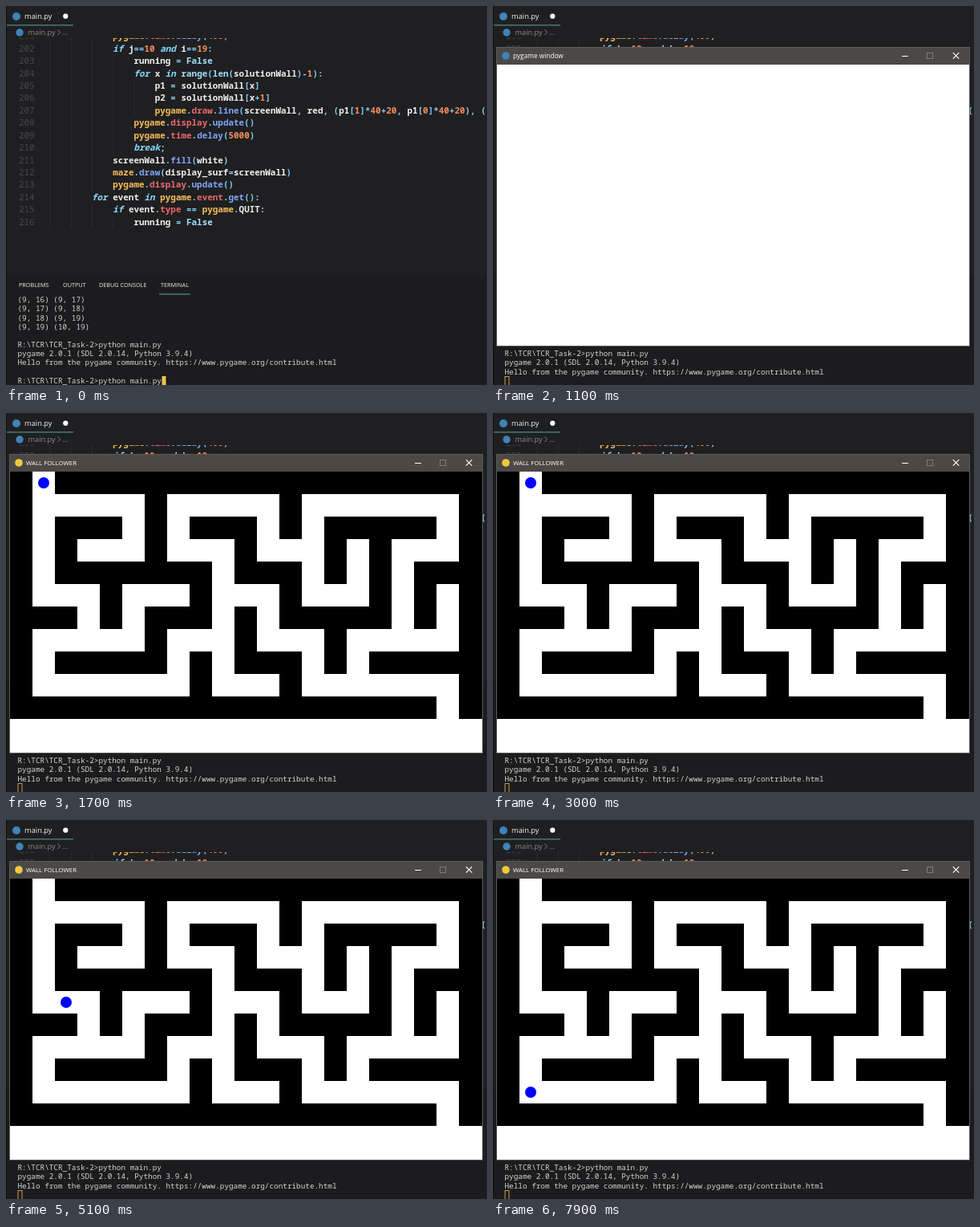
Recreate the animation shown at these times as an HTML page. Size 600x472 px, loop 8000 ms.

```html
<!DOCTYPE html>
<html lang="en">
<head>
<meta charset="utf-8">
<title>Wall follower</title>
<style>
  html, body { margin: 0; width: 100%; height: 100%; overflow: hidden; background: #1f1f21; }
  svg { display: block; width: 600px; height: 472px; }
  text { white-space: pre; }
  .code { font: 600 10.93px "Noto Sans Mono", monospace; font-variant-ligatures: none; }
  .term { font: 500 9.36px "Noto Sans Mono", monospace; font-variant-ligatures: none; fill: #d4d4d4; }
  .ui { font-family: "Open Sans", "Noto Sans", sans-serif; }
</style>
</head>
<body>
<svg id="stage" viewBox="0 0 600 472">
  <defs><clipPath id="view"><rect y="40" width="600" height="295"/></clipPath></defs>
  <rect width="600" height="472" fill="#1f1f21"/>
  <g id="editor" clip-path="url(#view)"></g>

  <g class="ui">
    <circle cx="13" cy="13" r="5" fill="#3f83b8"/>
    <text x="23" y="16" font-size="9.3" fill="#f4f4f4">main.py</text>
    <circle cx="74.3" cy="12.7" r="3.1" fill="#fff"/>
    <rect x="1" y="23.4" width="83" height="1" fill="#56a897"/>
    <circle cx="17" cy="33" r="4.7" fill="#3f83b8"/>
    <text x="27.5" y="35.8" font-size="9.2" fill="#8c8c8c">main.py</text>
    <path d="M64.5 29.5l3 3.3l-3 3.3" fill="none" stroke="#8c8c8c" stroke-width=".9"/>
    <text x="70" y="35.8" font-size="9.2" fill="#8c8c8c">...</text>
  </g>

  <rect y="335" width="600" height="137" fill="#1c1c1e"/>
  <g id="tabs" class="ui" font-size="7.25" font-weight="500" fill="#f0f0f0"></g>
  <rect x="191" y="358.4" width="39" height="1" fill="#56a897"/>
  <g id="term" class="term"></g>
  <rect id="caret" width="5" height="11"/>
  <rect width="1" height="472" fill="#0c0c0d"/>

  <g id="window">
    <rect x="4.5" y="51.5" width="590" height="372" fill="#4b4947" stroke="#5c5b59"/>
    <circle id="icon" cx="16" cy="62" r="4.8"/>
    <text id="caption" class="ui" x="25" y="65.2" fill="#fff"></text>
    <path d="M510 62.5h8" stroke="#fff"/>
    <rect x="541.5" y="58.5" width="7" height="7" fill="none" stroke="#7d7b79"/>
    <path d="M573.8 58.2l7.5 7.5m0 -7.5l-7.5 7.5" stroke="#fff" stroke-width="1.1"/>
    <rect id="screen" x="5" y="73" width="589" height="350"/>
    <g id="maze" shape-rendering="crispEdges"></g>
    <circle id="ball" r="7" fill="#00f"/>
  </g>
</svg>
<script>
const $ = id => document.getElementById(id);
const NS = "http://www.w3.org/2000/svg";
function add(parent, tag, attrs, text) {
  const el = document.createElementNS(NS, tag);
  set(el, attrs);
  if (text !== undefined) el.textContent = text;
  return parent.appendChild(el);
}
function set(el, attrs) {
  for (const k in attrs) el.setAttribute(k, attrs[k]);
}

// Editor: each entry is [indent level, code]
const CODE = [
  [3, "pygame.time.delay(400)"],
  [3, "if j==10 and i==19:"],
  [4, "running = False"],
  [4, "for x in range(len(solutionWall)-1):"],
  [5, "p1 = solutionWall[x]"],
  [5, "p2 = solutionWall[x+1]"],
  [5, "pygame.draw.line(screenWall, red, (p1[1]*40+20, p1[0]*40+20), ("],
  [4, "pygame.display.update()"],
  [4, "pygame.time.delay(5000)"],
  [4, "break;"],
  [3, "screenWall.fill(white)"],
  [3, "maze.draw(display_surf=screenWall)"],
  [3, "pygame.display.update()"],
  [2, "for event in pygame.event.get():"],
  [3, "if event.type == pygame.QUIT:"],
  [4, "running = False"]
];
const LEFT = 54.5, CHAR = 6.56, LINE = 15.43;
const KEYWORD = /^(if|and|for|in|break)$/;

function colour(word, before, after) {
  if (KEYWORD.test(word)) return "#89ddff";
  if (/^(False|range|len)$/.test(word)) return "#a5e0fb";
  if (/^\d+$/.test(word)) return "#f78c5c";
  if (/^(pygame|maze)$/.test(word)) return "#f5bd58";
  if (/^\W/.test(word)) return "#7fd0f5";
  if (after === "(") return "#7ea6f7";
  if (before === "." && word !== "QUIT") return "#e8686c";
  return "#eeeeee";
}

CODE.forEach(([level, src], i) => {
  const y = 41.3 + i * LINE;
  for (let g = 0; g < level; g++)
    add($("editor"), "rect", { x: LEFT + g * 4 * CHAR, y: y - 11.5, width: 1, height: LINE, fill: "#2c2c2e" });
  add($("editor"), "text", { class: "code", x: 16, y, fill: "#48484a", style: "font-weight:400" }, 201 + i);
  const line = add($("editor"), "text", { class: "code", x: LEFT + level * 4 * CHAR, y });
  for (const m of src.matchAll(/[A-Za-z_]\w*|\d+|\s+|[^\w\s]+/g)) {
    const word = m[0], end = m.index + word.length;
    const span = add(line, "tspan", { fill: colour(word, src[m.index - 1], src[end]) }, word);
    if (KEYWORD.test(word)) span.setAttribute("font-style", "italic");
  }
});

[["PROBLEMS", 16], ["OUTPUT", 71], ["DEBUG CONSOLE", 116], ["TERMINAL", 193]]
  .forEach(([name, x]) => add($("tabs"), "text", { x, y: 350.4 }, name));

// Terminal
const RUN = ["R:\\TCR\\TCR_Task-2>python main.py",
  "pygame 2.0.1 (SDL 2.0.14, Python 3.9.4)",
  "Hello from the pygame community. https://www.pygame.org/contribute.html", ""];
const LOG = ["(9, 16) (9, 17)", "(9, 17) (9, 18)", "(9, 18) (9, 19)", "(9, 19) (10, 19)", "", ...RUN, ...RUN];
const rows = Array.from({ length: 10 }, (_, i) => add($("term"), "text", { x: 14.5, y: 369.3 + i * 11.16 }));

// Maze
const CELL = 28;
const MAZE = [
  " #                   ",
  " ##### ##### ####### ",
  " #   # #   # #     # ",
  " # ### ### ### # ### ",
  " #       #   # # #   ",
  " ### ### ### ### # # ",
  "   # #   # #     # # ",
  " ##### ### ### ##### ",
  " #     # #   # #     ",
  " ####### ### ####### ",
  "                   # "
];
MAZE.forEach((row, r) => {
  for (const m of row.matchAll(/#+/g))
    add($("maze"), "rect", { x: 5 + m.index * CELL, y: 73 + r * CELL,
      width: m[0].length * CELL, height: CELL, fill: "#fff" });
});
add($("maze"), "rect", { x: 5, y: 381, width: 589, height: 42, fill: "#fff" });

// One cell per move: down, right, down, left, down
const STEPS = { D: [0, 1], R: [1, 0], L: [-1, 0] };
const PATH = [[1, 0]];
for (const s of "DDDDDRRDDLLDD") {
  const [c, r] = PATH[PATH.length - 1];
  PATH.push([c + STEPS[s][0], r + STEPS[s][1]]);
}

const LOOP = 8000, ENTER = 100, PRINT = 700, OPEN = 1100, BLACK = 1200, PLAY = 1600, WALK = 3100, BEAT = 400;
const show = (el, on) => el.setAttribute("visibility", on ? "visible" : "hidden");

function draw(t) {
  const top = t < ENTER ? 0 : t < PRINT ? 1 : 3;
  const typed = top ? 9 : 10;
  rows.forEach((row, i) => { row.textContent = i < typed ? LOG[top + i] : ""; });

  const open = t >= OPEN, play = t >= PLAY;
  set($("caret"), { x: top ? 15 : 194.5, y: open ? 461.5 : 461,
    fill: open ? "none" : "#f2c14e", stroke: open ? "#c9a04a" : "none" });

  show($("window"), open);
  show($("maze"), play);
  show($("ball"), play);
  $("screen").setAttribute("fill", open && t < BLACK ? "#fff" : "#000");
  $("icon").setAttribute("fill", play ? "#f0c93c" : "#3f83b8");
  $("caption").textContent = play ? "WALL FOLLOWER" : "pygame window";
  $("caption").setAttribute("font-size", play ? 7.9 : 8.3);

  const n = Math.max(0, Math.min(PATH.length - 1, Math.floor((t - WALK) / BEAT) + 1));
  set($("ball"), { cx: 19 + PATH[n][0] * CELL, cy: 87 + PATH[n][1] * CELL });
}

const start = performance.now();
function tick() {
  draw((performance.now() - start) % LOOP);
  requestAnimationFrame(tick);
}
draw(0);
requestAnimationFrame(tick);
</script>
</body>
</html>
```
